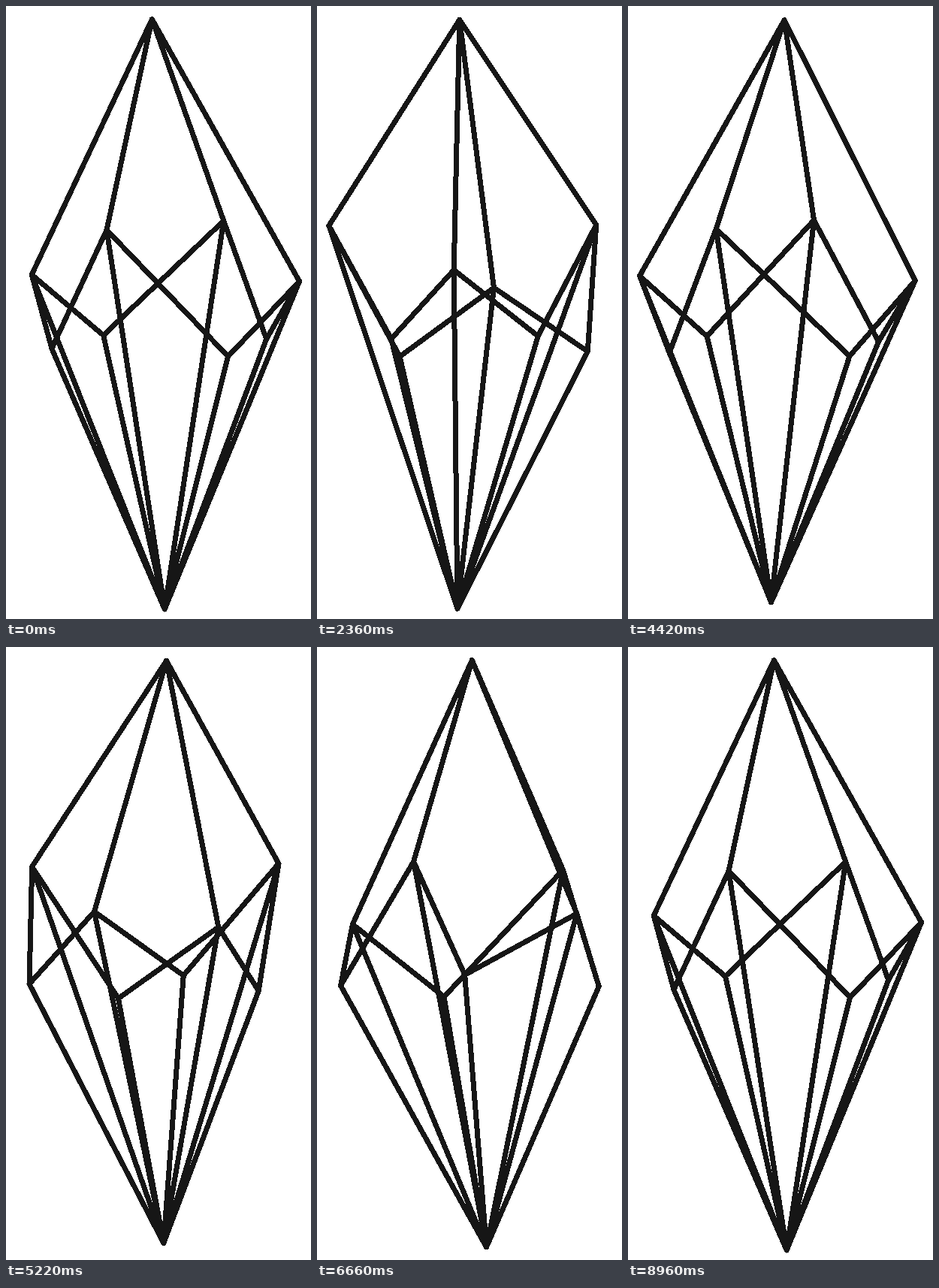
Write an HTML page that moves like this. It is 406 px wide and 816 px high and loops after 8.98 s.

```html
<!DOCTYPE html>
<html lang="en">
<head>
<meta charset="utf-8">
<title>Rotating wireframe crystal</title>
<style>
  html, body { margin: 0; width: 100%; height: 100%; overflow: hidden; background: #fff; }
  svg { display: block; width: 100%; height: 100%; }
  path {
    fill: none; stroke: #161616; stroke-width: 7;
    stroke-linecap: round; stroke-linejoin: round; shape-rendering: crispEdges;
  }
</style>
</head>
<body>
<svg viewBox="0 0 406 816"><path id="wire"/></svg>
<script>
const LOOP = 8980, STEP = 20, TURN = LOOP - STEP;
const CENTER_X = 201.7, HORIZON = 185, DISTANCE = 2900;

// Each vertex: x offset, height on screen at the axis, depth towards the viewer.
const vertices = {
  top: [-7.3, 18.2, 9.6],
  a: [-171.6, 362, -72],
  b: [-63.6, 291.3, 175.1],
  c: [92.4, 290.9, -142.4],
  d: [184.5, 362.4, 66.9],
  e: [-138.6, 451.9, 44.5],
  f: [-75.9, 451.8, -153.5],
  g: [89.1, 452, 149.1],
  h: [149.6, 451.7, -92.8],
  bottom: [9.4, 798.2, 22.1]
};

const ring = [..."aebgdhcf"];
const edges = [
  ...[..."abcd"].map(v => ["top", v]),
  ...ring.map((v, i) => [v, ring[(i + 1) % ring.length]]),
  ...ring.map(v => [v, "bottom"])
];

const wire = document.getElementById("wire");
const smooth = u => u * u * (3 - 2 * u);

function project([x, y, z], angle) {
  const cos = Math.cos(angle), sin = Math.sin(angle);
  const scale = 1 / (1 - (z * cos + x * sin) / DISTANCE);
  const px = CENTER_X + (x * cos - z * sin) * scale;
  const py = HORIZON + (y - HORIZON) * scale;
  return px.toFixed(2) + " " + py.toFixed(2);
}

// The crystal rests for one step, then makes one eased turn.
function draw(time) {
  const t = Math.floor((time % LOOP) / STEP) * STEP;
  const angle = 2 * Math.PI * smooth(Math.max(0, t - STEP) / TURN);
  const points = {};
  for (const name in vertices) points[name] = project(vertices[name], angle);
  wire.setAttribute("d", edges.map(([p, q]) => `M${points[p]}L${points[q]}`).join(""));
}

let start;
function tick(now) {
  start ??= now;
  draw(Math.max(0, now - start));
  requestAnimationFrame(tick);
}
draw(0);
requestAnimationFrame(tick);
</script>
</body>
</html>
```
